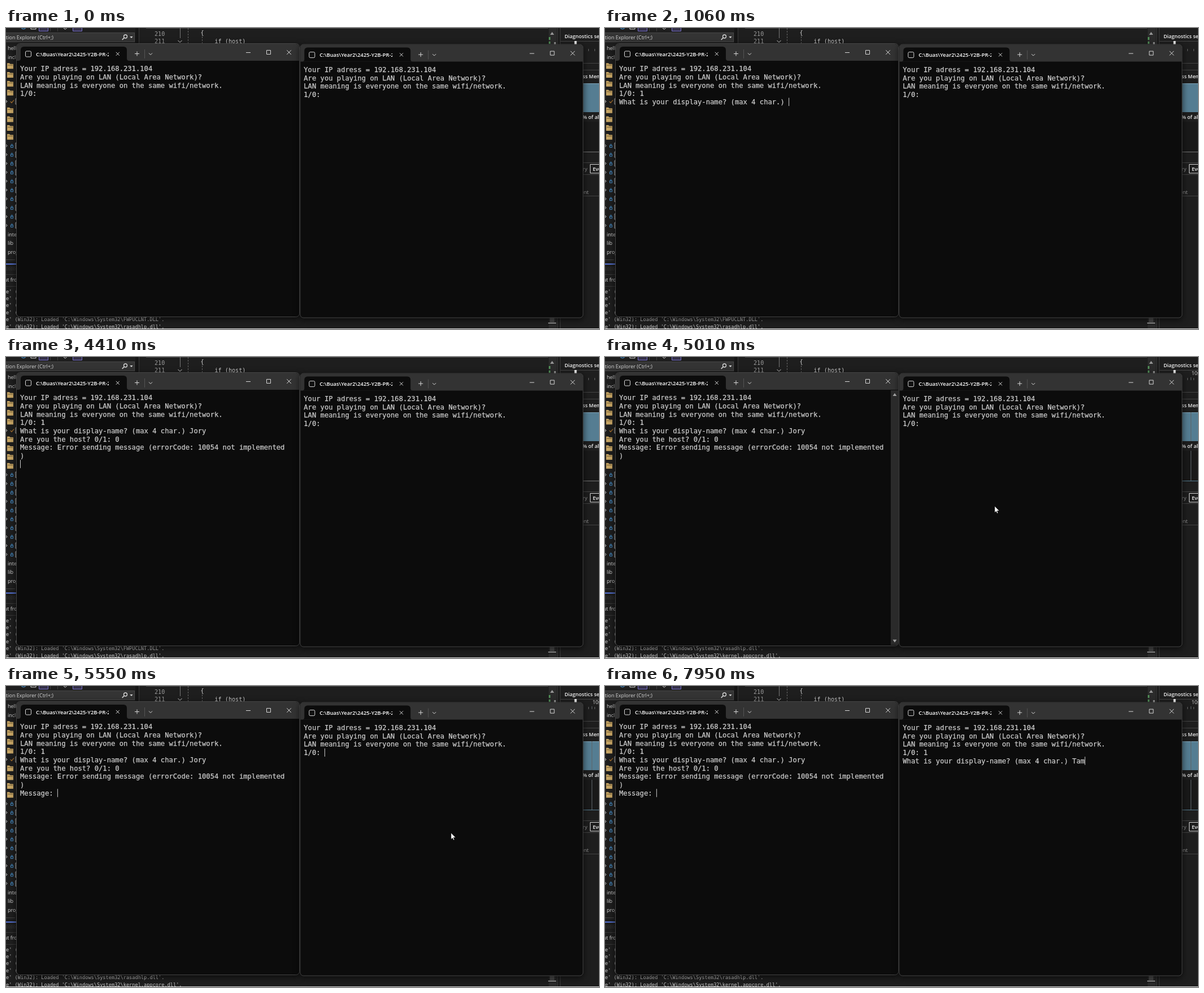
An HTML page for the animation above (8 s loop, 1050 px wide and 533 px high).

```html
<!DOCTYPE html>
<html lang="en">
<head>
<meta charset="utf-8">
<title>Two terminals</title>
<style>
  html, body { margin: 0; width: 100%; height: 100%; overflow: hidden; background: #1e1e1e; }
  svg { display: block; width: 100%; height: 100%; }
  text { white-space: pre; }
  .ui { font: 9px "Open Sans", "Noto Sans", sans-serif; fill: #d6d6d6; }
  .bold { font-weight: 600; fill: #f2f2f2; }
  .dim { fill: #9a9a9a; }
  .code { font: 10.15px "DejaVu Sans Mono", monospace; fill: #cfcfcf; }
  .out { font: 8.64px "DejaVu Sans Mono", monospace; fill: #c6c6c6; }
  .term { font: 12.16px "DejaVu Sans Mono", monospace; fill: #ccc; stroke: #ccc; stroke-width: .25px; }
  .title { font: 600 9.4px "Open Sans", "Noto Sans", sans-serif; fill: #fff; }
  .line { fill: none; stroke: #d8d8d8; }
  .window { filter: drop-shadow(0 3px 6px #000a); }
</style>
</head>
<body>
<svg viewBox="0 0 1050 533" preserveAspectRatio="none">
  <defs>
    <clipPath id="tabClip"><rect x="50" y="36" width="132" height="20"/></clipPath>
    <g id="frame">
      <rect x="18.5" y="27.5" width="501" height="484" rx="6" fill="#0c0c0c" stroke="#454545"/>
      <path d="M19 58V34q0-6 6-6H513q6 0 6 6V58Z" fill="#333"/>
      <path d="M22 58q4 0 4-4V39q0-6 6-6H208q6 0 6 6V54q0 4 4 4Z" fill="#0c0c0c"/>
      <rect x="34.5" y="41" width="10" height="10" rx="2" fill="#111" stroke="#d8d8d8"/>
      <text class="title" x="53" y="49.6" clip-path="url(#tabClip)">C:\Buas\Year2\2425-Y2B-PR-2425</text>
      <path class="line" d="M194.8 42.8l6 6m0-6l-6 6M228 45.5h8m-4-4v8M253 44.5l3 3 3-3M425 43.5h8M461.5 39.5h7v7h-7ZM497.3 39.3l7.6 7.6m0-7.6l-7.6 7.6"/>
      <path d="M245.5 38v16" stroke="#555"/>
    </g>
  </defs>

  <!-- editor behind the windows -->
  <rect width="1050" height="533" fill="#1e1e1e"/>
  <rect x="229" width="6" height="30" fill="#161616"/>
  <path d="M235.5 0V30M976.5 0V533M981.5 0V533" stroke="#3a3a3a"/>
  <path d="M248 .5H960" stroke="#484848"/>
  <circle cx="31" cy="-2" r="4" class="line" style="stroke:#4a9ce0"/>
  <path class="line" d="M44 0v2h9v-2M62.5 0v3h8v-3M102 0l3 2.5 3-3"/>
  <path d="M58.5 0v5.5h16V0M118.5 0v5.5h16V0" fill="#343048" stroke="#7770c8"/>
  <path d="M78.5 0v6M91.5 0v6" stroke="#3d3d3d"/>
  <rect x="-2" y="8.5" width="229.5" height="16" fill="#343434" stroke="#484848"/>
  <text class="ui" x="84" y="20" text-anchor="end">Search Solution Explorer (Ctrl+;)</text>
  <circle class="line" cx="211.5" cy="15" r="3" stroke-width="1.3"/>
  <path class="line" d="M209.3 17.3l-3.6 3.6" stroke-width="1.5"/>
  <path d="M219.5 15h5l-2.5 3Z" fill="#ddd"/>
  <g class="code">
    <text x="263" y="13.5" class="dim">210</text><text x="263" y="27" class="dim">211</text>
    <text x="344.5" y="12">{</text><text x="369.5" y="27">if (host)</text>
  </g>
  <path d="M308.5 0V18" stroke="#777"/>
  <path d="M322.5 0V28M347.5 15V28" stroke="#666" stroke-dasharray="3 2"/>
  <path class="line" d="M304.5 22l3.5 3.5 3.5-3.5"/>
  <rect x="961" width="14" height="30" fill="#2b2b2b"/>
  <path d="M963.5 12h7l-3.5-5Z" fill="#999"/>
  <path d="M962.5 16v5m0 3v4" stroke="#4f8a55" stroke-width="3"/>
  <path d="M972 25v4" stroke="#999" stroke-width="3"/>

  <!-- diagnostics panel -->
  <text class="ui bold" x="989" y="18">Diagnostics session</text>
  <path d="M982 23.5h68M1022 62.5h28M1022 74.5h28M1022 238.5h28M1022 259.5h28M1022 297.5h28" stroke="#444"/>
  <path d="M1022 219.5h28" stroke="#777"/>
  <path d="M1008.5 23v7" stroke="#eee" stroke-width="4"/>
  <path d="M1031.5 37v4m11-4v4" stroke="#666"/>
  <text class="ui" x="1018" y="53">s</text>
  <text class="ui bold" x="1021" y="88.5">ss Memory</text>
  <rect x="1022" y="98" width="28" height="51" fill="#557d92"/>
  <path d="M1022 98.5h28" stroke="#7fa6ba"/>
  <text class="ui bold" x="1021" y="160.5">% of all processors</text>
  <rect x="1022" y="166" width="28" height="53" fill="#191919"/>
  <text class="ui dim" x="1021" y="253">ry</text>
  <path d="M1050 241.5h-15.5v15.5h15.5" class="line"/>
  <text class="ui bold" x="1039" y="253">Events</text>
  <text class="ui dim" x="1018" y="293.5">ent</text>
  <g data-show="4610-8000">
    <text class="ui" x="1038.5" y="31.5">10s</text>
    <path d="M1037.5 36v5M1037.5 98v51M1037.5 166v53" stroke="#5d6468"/>
    <path d="M1022 219.5h28" stroke="#557d92"/>
  </g>
  <rect x="961" y="513" width="14" height="20" fill="#292929"/>
  <rect x="963" y="513" width="8" height="8" fill="#4c4c4c"/>
  <path d="M960 522.5h14" stroke="#ddd"/>

  <g id="tree"></g>

  <!-- output panel -->
  <path d="M0 410.5h16" stroke="#444"/>
  <path d="M0 418h19" stroke="#5673d6" stroke-width="2"/>
  <path d="M0 424.5h19M1 426.5h18M0 428.5h19" stroke="#444" stroke-dasharray="1 2"/>
  <path d="M0 436.5h19M0 457.5h19" stroke="#383838"/>
  <text class="ui" x="18.5" y="449" text-anchor="end">Show output frc</text>
  <g id="output" class="out"></g>
  <path d="M0 532.5H1050" stroke="#d8d8d8"/>

  <g class="window" id="left"><use href="#frame"/></g>
  <g class="window" id="right" transform="translate(502.3 1.6)"><use href="#frame"/></g>
  <g data-show="210-825 4610-5550">
    <rect x="506" y="59" width="13" height="451" fill="#2a2a2a"/>
    <path d="M509.5 69h7l-3.5-5ZM509.5 500.5h7l-3.5 5Z" fill="#a0a0a0"/>
  </g>

  <g id="pointer">
    <circle r="9.5" cy="-.5" fill="#a39b12" data-show="280-440 5210-5410"/>
    <path d="M0 0V11.6L2.6 9.2 4.3 13 6.1 12.2 4.4 8.5H8.2Z" fill="#fff" stroke="#000" stroke-width=".6"/>
  </g>
</svg>

<script>
const LOOP = 8000, ROW = 14.65, COL = 7.32;
const byId = id => document.getElementById(id);
const svgText = (x, y, text = "", cls = "") => `<text x="${x}" y="${y}" class="${cls}">${text}</text>`;
const latest = (list, t) => list.filter(entry => entry[0] <= t).pop();

// Solution tree
const CHECKED_ROW = 6, LAST_FOLDER_ROW = 10;
const names = { 0: "hello", 1: "include", 21: "inter", 22: "lib", 23: "project" };
const folder = y =>
  `<path d="M2 ${y - 5}h4l1.5 1.5h5.5v8.5h-11Z" fill="#c9a766"/><path d="M3 ${y - 1.5}h9" stroke="#6e5a35"/>`;
const fileRow = y => `<path class="line" d="M-1 ${y - 3}l3 3-3 3M20 ${y - 5}h-3v10h3"/>`;
const check = y => `<path d="M8 ${y}l2 2.5 4-5" fill="none" stroke="#b0752e" stroke-width="1.3"/>`;
const lock = y =>
  `<path d="M8.5 ${y - .5}h4v3.5h-4ZM9.3 ${y - .5}v-1.5q1.2-2 2.4 0v1.5" fill="none" stroke="#4a9ce0" stroke-width=".9"/>`;

function treeRow(n) {
  const y = 36 + 15.68 * n;
  if (names[n]) return svgText(3, y + 3.3, names[n], "ui");
  if (n === CHECKED_ROW) return fileRow(y) + check(y);
  return n <= LAST_FOLDER_ROW ? folder(y) : fileRow(y) + lock(y);
}
byId("tree").innerHTML = Array.from({ length: 24 }, (_, n) => treeRow(n)).join("");

// Debugger output
const dll = file => `e' (Win32): Loaded 'C:\\Windows\\System32\\${file}'.`;
const modules = ["mswsock.dll", "dnsapi.dll", "IPHLPAPI.DLL", "nsi.dll", "FWPUCLNT.DLL", "rasadhlp.dll", "kernel.appcore.dll"];
byId("output").innerHTML = [0, 1].map(shift =>
  `<g data-show="${shift ? "4610-8000" : "0-4610"}">` +
  modules.slice(shift, shift + 6).map((file, i) => svgText(0, 469.5 + 12.4 * i, dll(file))).join("") + "</g>"
).join("");

// Terminal contents: [time, row, text]; carets: [time, row, column] or [time] when off
const intro = [
  [0, 0, "Your IP adress = 192.168.231.104"],
  [0, 1, "Are you playing on LAN (Local Area Network)?"],
  [0, 2, "LAN meaning is everyone on the same wifi/network."],
  [0, 3, "1/0: "]
];
const ask = "What is your display-name? (max 4 char.) ";
const typed = (times, row, prompt, word) =>
  times.map((time, i) => [time, row, prompt + word.slice(0, i)]);
const typedCaret = (times, row, column) => times.map((time, i) => [time, row, column + i]);

const leftName = [1060, 1560, 1760, 1960, 2090];
const rightName = [6890, 7680, 7880, 7950];
const terminals = [
  {
    id: "left",
    lines: [
      ...intro, [750, 3, "1/0: 1"],
      ...typed(leftName, 4, ask, "Jory"),
      [2350, 5, "Are you the host? 0/1: "], [3280, 5, "Are you the host? 0/1: 0"],
      [4410, 6, "Message: Error sending message (errorCode: 10054 not implemented"],
      [4410, 7, ")"], [5350, 8, "Message: "]
    ],
    carets: [
      [0], [360, 3, 5], [750, 3, 6], ...typedCaret(leftName, 4, 41),
      [2350, 5, 23], [2950], [3280, 5, 24], [3880], [4410, 8, 0], [4940], [5350, 8, 9]
    ]
  },
  {
    id: "right",
    lines: [...intro, [6690, 3, "1/0: 1"], ...typed(rightName, 4, ask, "Tam")],
    carets: [[0], [5210, 3, 5], [5820], [6360, 3, 5], [6690, 3, 6], ...typedCaret(rightName, 4, 41)]
  }
];

for (const term of terminals) {
  const group = byId(term.id);
  let markup = "";
  for (let row = 0; row < 9; row++) markup += svgText(25, 76.4 + ROW * row, "", "term");
  group.insertAdjacentHTML("beforeend", markup + '<rect class="caret" width="1" height="14.5" fill="#ccc"/>');
  term.rows = [...group.querySelectorAll(".term")];
  term.caret = group.querySelector(".caret");
}

// Pointer stops: [time, x, y] or [time] when hidden
const pointerStops = [
  [0], [70, 720, 262], [140, 590, 264], [210, 430, 266], [280, 300, 264], [750],
  [4610, 300, 264], [4700, 345, 266], [4800, 430, 268], [4940, 600, 266],
  [5010, 690, 264], [5080, 750, 262], [5140, 778, 261], [5210, 784, 261],
  [5410, 788, 260], [6690]
];
const pointer = byId("pointer");

const timed = [...document.querySelectorAll("[data-show]")].map(el => ({
  el, spans: el.dataset.show.split(" ").map(span => span.split("-").map(Number))
}));
const show = (el, on) => el.setAttribute("visibility", on ? "inherit" : "hidden");

function render(t) {
  for (const { el, spans } of timed) show(el, spans.some(([from, to]) => t >= from && t < to));

  for (const { lines, carets, rows, caret } of terminals) {
    rows.forEach((node, row) => {
      const entry = latest(lines.filter(line => line[1] === row), t);
      const text = entry ? entry[2] : "";
      if (node.textContent !== text) node.textContent = text;
    });
    const [, row, column] = latest(carets, t);
    show(caret, row !== undefined);
    if (row !== undefined) {
      caret.setAttribute("x", 25 + COL * column);
      caret.setAttribute("y", 65 + ROW * row);
    }
  }

  const [, x, y] = latest(pointerStops, t);
  show(pointer, x !== undefined);
  if (x !== undefined) pointer.setAttribute("transform", `translate(${x} ${y})`);
}

const start = performance.now();
function tick() {
  render((performance.now() - start) % LOOP);
  requestAnimationFrame(tick);
}
tick();
</script>
</body>
</html>
```
